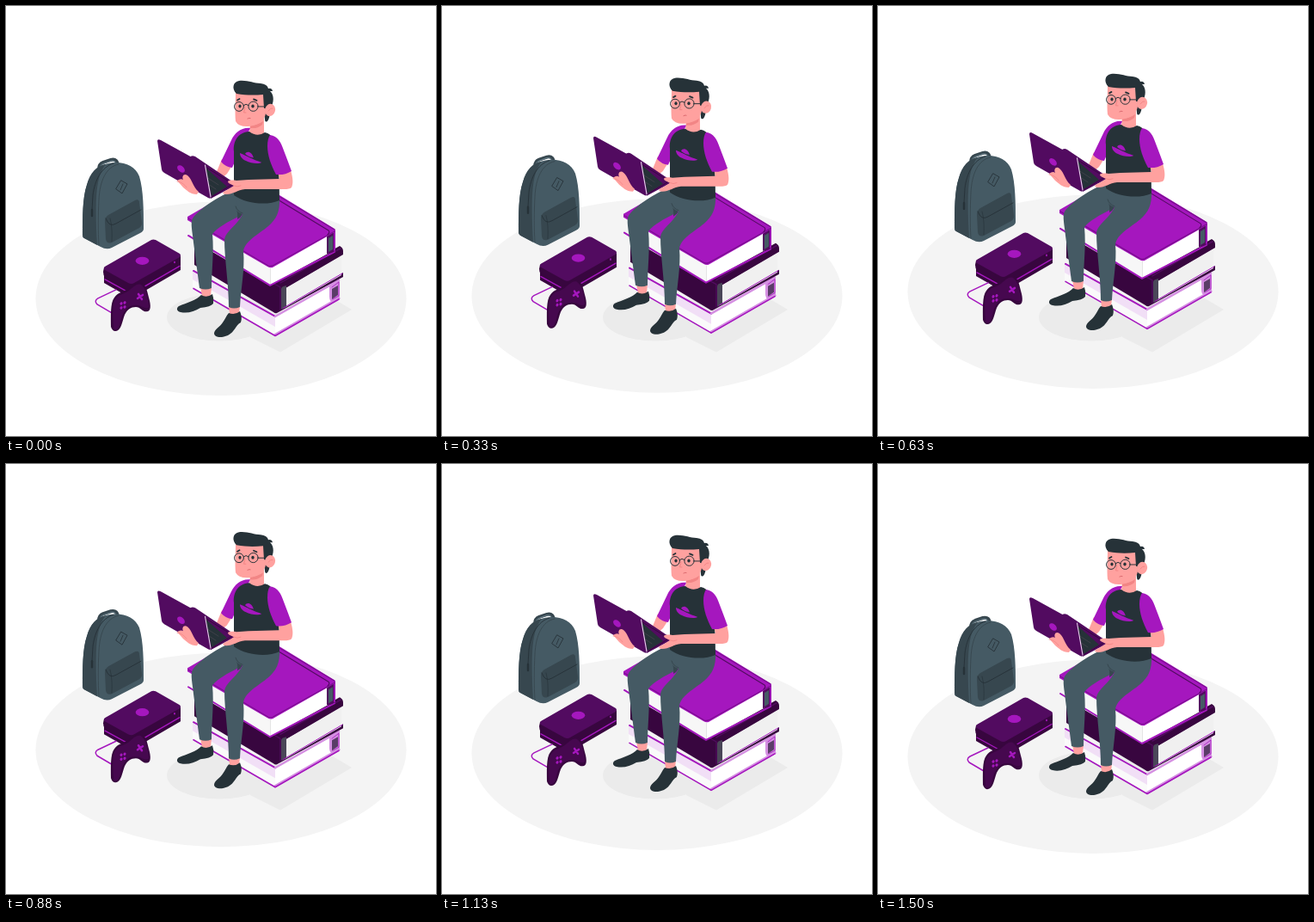
An HTML page with a canvas for the animation above (1.54 s loop, 500 px wide and 500 px high).

```html
<!DOCTYPE html>
<html lang="en">
<head>
<meta charset="utf-8">
<title>Student on books</title>
<style>
  html, body { margin: 0; width: 100%; height: 100%; overflow: hidden; background: #fff; }
  canvas { display: block; width: 100vw; height: 100vh; }
</style>
</head>
<body>
<canvas id="stage"></canvas>
<script>
const SIZE = 500, LOOP = 1540, STEPS = 37, LIFT = 8.5;
const PURPLE = '#a517be', PLUM = '#520b60', DEEP = '#38063f', LILAC = '#f1dff6', ORCHID = '#d58fe2', VIOLET = '#7d0d92';
const SKIN = '#ffa19f', BLUSH = '#f28585', INK = '#263238', SLATE = '#455a64', SHADE = '#37474f';

const canvas = document.getElementById('stage');
const ctx = canvas.getContext('2d');
const ratio = window.devicePixelRatio || 1;
canvas.width = canvas.height = SIZE * ratio;

function fill(d, color) {
  ctx.fillStyle = color;
  ctx.fill(new Path2D(d));
}

function line(d, color, width = 1) {
  ctx.strokeStyle = color;
  ctx.lineWidth = width;
  ctx.lineCap = ctx.lineJoin = 'round';
  ctx.stroke(new Path2D(d));
}

function oval(x, y, rx, ry, color, turn = 0) {
  ctx.fillStyle = color;
  ctx.beginPath();
  ctx.ellipse(x, y, rx, ry, turn, 0, Math.PI * 2);
  ctx.fill();
}

function ring(x, y, r, color, width) {
  ctx.strokeStyle = color;
  ctx.lineWidth = width;
  ctx.beginPath();
  ctx.arc(x, y, r, 0, Math.PI * 2);
  ctx.stroke();
}

function shadow() {
  oval(248, 362, 61, 27.5, '#ebebeb');
  fill('M284 385L319 402.5L402 353L380 340L270 340Z', '#ebebeb');
}

function bottomBook() {
  fill('M217 309L313 362V383L217 328Z', LILAC);
  fill('M313 362L380 323V344L313 383Z', '#fff');
  fill('M217 318L313 373V383L217 328Z', '#fafafa');
  line('M218 308L313 361', PURPLE, 2);
  line('M313 361L387 319', ORCHID, 2.4);
  fill('M376 325Q378 321 388 318V341L381 345Q376 344 376 338Z', ORCHID);
  line('M313 382.5L387 340', ORCHID, 3.2);
  line('M218 328.5L313 383.5L387 341', PURPLE, 1.6);
  line('M379 327L387 321V337L380 341', PURPLE, .8);
  fill('M379 329L386 325V336L379 341Z', '#5a3c68');
}

function middleBook() {
  fill('M219 273L307 324L388 279Q392 281 392 285V289L322 330V351L392 310V315L315 357Q313 358 311 356L219 301Z', DEEP);
  fill('M324 329L390 291V313L324 351Z', '#f0f0f0');
  fill('M320 329Q320 326 326 325V350L320 353Z', '#4a4658');
  line('M322 351.5L391 311', PURPLE, 1);
  line('M319 322L389 282', PLUM, 1.5);
  line('M277 304L319 327V353', PLUM, 1.2);
}

function topBook() {
  fill('M218 250L307 303V325L218 273Z', '#f7f7f7');
  fill('M307 303L376 264V287L307 325Z', '#fff');
  line('M307.5 305V324', '#ddd', .8);
  line('M212 267L307 325L382 286', PURPLE, 2);
  fill('M373 268Q375 265 383 261V284Q380 288 373 288Z', PLUM);
  fill('M375 270L380 267V283L375 286Z', SLATE);
  line('M382 263V284', PURPLE, 1.8);
  fill('M211 245L287 201L382 259Q384 261 382 263L310 304Q307 305 304 303L211 249Z', PURPLE);
  line('M212 247L305 302Q307 303 310 302L382 262', VIOLET, 1.2);
  line('M306 219L375 261Q377 263 374 266', PLUM, 1.1);
  line('M312 218L382 260', VIOLET, 1.2);
}

function backpack() {
  line('M108 190Q108 184 113 182L122 179Q130 177 130 187', SHADE, 4);
  line('M109 189Q109 185 114 183L122 180Q128 179 128 186', '#5d737e', 1.2);
  fill('M89 266C89 246 89 222 94 208C98 194 105 186 119 183C135 180 150 185 155 198C160 215 160 237 160 259Q160 262 156 264L123 281Q117 284 110 280L91 270Q89 269 89 266Z', SLATE);
  fill('M89 266C89 246 89 222 94 208C98 194 105 186 116 184C105 197 103 221 106 278L91 270Q89 269 89 266Z', SHADE);
  line('M125 183C111 187 103 203 101 220L100 237', INK, .9);
  line('M131 184C116 187 109 204 108 225C107 245 107 261 108 278', SHADE, .9);
  line('M100 237V244', INK, 2.4);
  fill('M115 250Q115 246 119 243L150 226Q155 224 155 229L158 251Q159 255 155 258L123 275Q117 277 116 271Z', SHADE);
  line('M116 247Q120 258 128 253L157 237', INK, .9);
  line('M121 247Q124 258 123 274', INK, .6);
  line('M134 203L141 207L135 218L128 213Z', INK, .9);
  line('M136 207L133 214', INK, .8);
}

function gameConsole() {
  fill('M114 312L146 326L203 294V307L148 339Q145 340 142 338L114 322Z', DEEP);
  line('M115 318L146 335L202 302.5', PURPLE, 1.4);
  fill('M114 304L171 275L203 291V298L148 331Q145 332 142 331L115 315Q113 313 113 309Z', DEEP);
  fill('M115 303L169 272Q171 271 174 272L202 288Q204 290 202 292L149 322Q146 324 142 322L115 307Q113 305 115 303Z', PLUM);
  oval(158.5, 296.4, 7.8, 4.6, PURPLE);
  oval(196, 298, .9, 1.3, PURPLE);
}

function controller() {
  line('M128 330L107 340Q102 343 106 347L123 357', PURPLE, 1.5);
  fill('M122 373C122 362 121 345 126 339C130 333 137 332 142 329C148 326 151 320 157 322C163 324 164 331 166 339C169 349 168 354 165 355C159 357 157 350 151 350C145 350 141 353 138 359C135 367 134 377 128 378Q124 379 122 373Z', DEEP);
  fill('M125 374C124 360 123 346 128 340C133 334 139 335 144 330C149 326 154 321 158 325C164 330 166 345 166 350C161 354 157 347 150 348C142 348 138 353 135 360C133 367 131 376 128 376Q126 377 125 374Z', '#46084f');
  for (const [x, y] of [[134, 346], [138, 345], [134, 351], [138, 350]]) oval(x, y, 1.5, 1.8, PURPLE, .5);
  line('M153 340L159 336M154 335L158 341', PURPLE, 2.5);
}

function legs() {
  fill('M226 327H239L238 337Q233 340 228 337Z', SKIN);
  fill('M259 348H272L271 358Q266 361 260 358Z', SKIN);
  fill('M227 336Q233 340 240 335Q242 340 241 346Q238 350 226 351C219 355 211 358 203 356C198 355 198 351 201 349C210 345 222 342 227 336Z', INK);
  fill('M259 357Q266 360 272 355Q275 362 273 368C267 371 266 379 258 383C251 386 243 386 242 381C242 376 249 373 252 368C255 364 256 360 259 357Z', INK);
  fill('M265 214C248 221 224 236 217 247C214 252 217 264 218 275L225 328Q232 331 239 328C239 306 242 288 240 265C247 257 258 251 268 246L300 225Z', SLATE);
  fill('M318 222C319 240 314 248 305 256C293 266 278 273 276 285C278 306 273 329 272 350Q265 353 259 350C259 323 254 294 254 272C255 262 270 254 275 242L266 224Z', SLATE);
  fill('M267 233C268 239 271 241 275 242Q273 246 269 248Q270 241 267 233Z', SHADE);
  line('M267 233Q269 239 275 241', SHADE, 1);
}

function laptop() {
  fill('M213 176Q216 173 220 175L266 206V209L238 224L232 187Z', PLUM);
  fill('M232 188L257 210L239 221Z', INK);
  line('M233 199L247 208M235 207L244 213', '#46434f', .8);
  line('M214 176L264 207L239 222', DEEP, 1);
  fill('M176 157Q176 154 180 156L229 183Q231 184 232 187L238 222Q238 225 235 223L184 194Q181 192 181 190Z', PLUM);
  line('M231.5 185L238 222', '#e6cfea', 1.1);
  oval(203.5, 189.5, 5.2, 3.3, PURPLE, .75);
}

function torso() {
  fill('M251 178L264 184L257 195L247 204L244 195Z', SKIN);
  fill('M284 134L300 130V148Q292 155 283 148Z', SKIN);
  fill('M284 139Q292 139 299 134L298 138Q292 143 284 142Z', BLUSH);
  fill('M284 142C273 141 266 148 262 156L250 181Q255 187 263 188L272 168Z', PURPLE);
  fill('M283 146Q292 153 301 147Q308 148 311 156C317 172 318 199 318 226C305 232 280 231 265 220V169C264 158 269 147 283 146Z', INK);
  fill('M272 171C276 173 280 174 285 177C291 180 296 181 297 182C294 184 284 183 279 180C274 178 272 174 272 171Z', PURPLE);
  fill('M278 172C280 168 286 169 288 177Q282 176 278 172Z', PURPLE);
  line('M278 173Q283 177 289 177', INK, .7);
}

function arms() {
  fill('M316 193L331 191C334 201 334 207 332 211Q330 213 323 213L278 213C269 214 264 219 256 219C251 219 251 216 257 214L265 209L259 206C256 203 261 202 268 203L282 202L318 201Z', SKIN);
  line('M265 209Q269 211 273 209', BLUSH, .8);
  fill('M307 150C316 151 320 159 323 168Q328 181 332 192Q324 197 314 196C308 185 304 173 304 163Q304 154 307 150Z', PURPLE);
  fill('M199 203Q203 200 206 202C204 198 207 194 211 197C217 202 217 210 224 216L222 219C214 219 210 214 206 211Z', SKIN);
  line('M199 204Q206 205 210 211', BLUSH, .7);
}

function head() {
  fill('M299 111L309 114C306 121 308 129 304 134Q301 136 301 132Z', INK);
  fill('M267 100C267 111 266 124 267 134Q270 140 280 140C291 140 302 132 302 124L300 101Z', SKIN);
  fill('M268 102C262 96 264 88 271 87C281 86 288 90 296 90Q304 91 305 96Q309 95 310 99L307 99C312 103 312 113 307 119L300 119L299 103C289 104 279 104 268 102Z', INK);
  oval(307, 121, 6, 7.2, SKIN, .25);
  line('M305 122Q308 118 310 119', BLUSH, .9);
  line('M269 109.5L271.5 108', INK, 1.8);
  line('M288 108.5L291.5 110', INK, 1.8);
  oval(272, 116.5, 1.6, 2, INK);
  oval(287, 116.5, 1.7, 2, INK);
  ring(271, 117, 5.4, INK, 1);
  ring(287.5, 116.8, 5.6, INK, 1);
  line('M276.3 115.5Q279 113 282 115.5M293 117L300 117', INK, 1);
  line('M278 118L276.5 124H279', BLUSH, 1);
  line('M281 131Q282.5 130 284 130.5', '#d9666c', 1);
}

const scene = [bottomBook, middleBook, topBook, backpack, gameConsole, controller, legs, torso, laptop, arms, head];

// The motion advances in hard steps, 24 per second.
function bob(time) {
  const step = Math.floor((time % LOOP) / LOOP * STEPS) + 1;
  return -LIFT * (1 - Math.cos(step / STEPS * Math.PI * 2)) / 2;
}

const start = performance.now();

function draw() {
  const lift = bob(performance.now() - start);
  ctx.setTransform(ratio, 0, 0, ratio, 0, 0);
  ctx.fillStyle = '#fff';
  ctx.fillRect(0, 0, SIZE, SIZE);
  oval(250, 340.3 + lift, 215.5, 112.7, '#f4f4f4');
  shadow();
  ctx.translate(0, lift);
  scene.forEach(part => part());
  requestAnimationFrame(draw);
}

draw();
</script>
</body>
</html>
```
